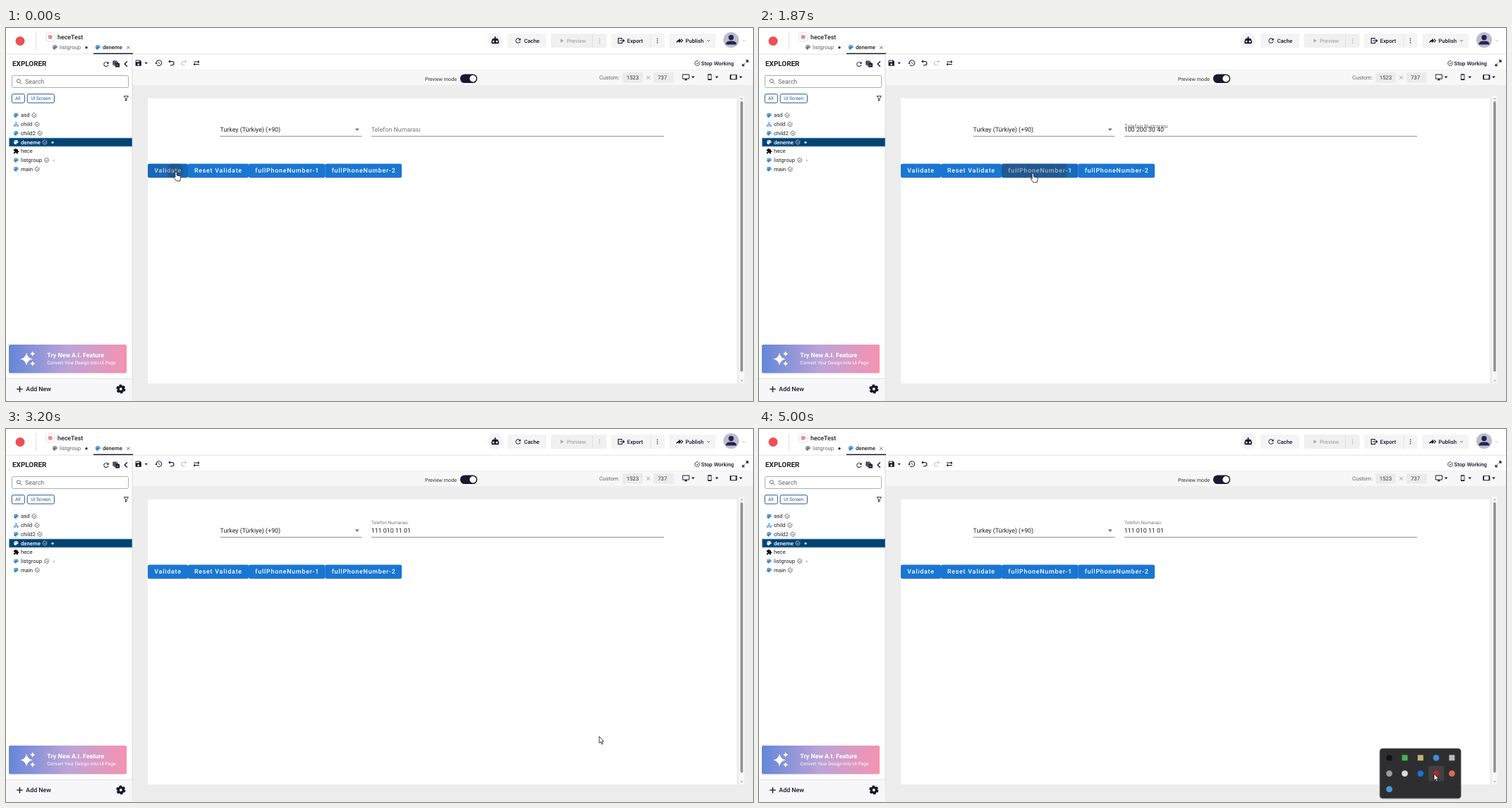
Animation, 1059 px wide and 529 px high, one loop 5200 ms. Source, as an HTML page:

```html
<!DOCTYPE html>
<html lang="en">
<head>
<meta charset="utf-8">
<title>Phone field demo</title>
<style>
html, body { margin: 0; width: 100%; height: 100%; overflow: hidden; background: #fff; }
svg { display: block; width: 1059px; height: 529px; font-family: Roboto, Arial, sans-serif; text-rendering: geometricPrecision; }
</style>
</head>
<body>
<svg id="stage" viewBox="0 0 1059 529"></svg>
<script>
const LOOP = 5200, STEP = 200 / 3;
const INK = '#15152b', GREY = '#666', BLUE = '#1976d2', SKY = '#2f86c9', RED = '#ee4f55';

// 24-unit icons; a leading ~ marks an outline icon
const ICONS = {
  refresh: 'M17.65 6.35A8 8 0 1 0 19.730 14h-2.080A6 6 0 1 1 16.220 7.780L13 11h7V4z',
  palette: 'M12 3a9 9 0 1 0 0 18c2 0 2-2 1.100-3s-.1-2 1.400-2H16c3 0 5-2 5-5c0-4.400-4-8-9-8z' +
    [[5, 10.5], [8, 6.5], [13, 6.5], [16, 10.5]].map(([x, y]) => `M${x} ${y}a1.500 1.500 0 1 0 3 0a1.500 1.500 0 1 0-3 0z`).join(''),
  undo: '~M8 4L4 8l4 4M4 8h10a6 6 0 0 1 0 12H8',
  redo: '~M16 4l4 4-4 4M20 8H10a6 6 0 0 0 0 12h6',
  history: 'M13 3a9 9 0 0 0-9 9H1l3.900 3.900L9 12H6a7 7 0 1 1 2.060 4.940l-1.420 1.420A9 9 0 1 0 13 3zM12 8v5l4.300 2.500.7-1.200-3.500-2V8z',
  save: 'M17 3H5a2 2 0 0 0-2 2v14a2 2 0 0 0 2 2h14a2 2 0 0 0 2-2V7zM12 19a3 3 0 1 1 0-6 3 3 0 0 1 0 6zM15 9H5V5h10z',
  swap: 'M17 3l5 5-5 5V9.200H3V6.800h14zM7 11v3.800h14v2.400H7V21l-5-5z',
  check: '~M21 11v1a9 9 0 1 1-5-8M8 11l4 4L22 5',
  search: '~M16 10a6 6 0 1 1-12 0a6 6 0 1 1 12 0M14.500 14.500L21 21',
  filter: '~M4 4h16l-6 8v7l-4 2v-9z',
  robot: 'M12 2a2 2 0 0 1 1 3.700V7h1a7 7 0 0 1 7 7h1v4h-1v3H3v-3H2v-4h1a7 7 0 0 1 7-7h1V5.700A2 2 0 0 1 12 2zM7.500 13a2.500 2.500 0 1 0 0 5a2.500 2.500 0 0 0 0-5zM16.500 13a2.500 2.500 0 1 0 0 5a2.500 2.500 0 0 0 0-5z',
  play: 'M7 4v16l13-8z',
  dots: [5, 12, 19].map(y => `M10 ${y}a2 2 0 1 0 4 0a2 2 0 1 0-4 0z`).join(''),
  out: '~M14 8V4H3v16h12v-4M8 12h14M18 8l4 4-4 4',
  share: 'M9 5l7 7-7 7v-4c-4 0-6 1-9 4c1-6 4-9 9-10zM15 5l7 7-7 7v-3l4-4-4-4z',
  puzzle: 'M20.500 11H19V7a2 2 0 0 0-2-2h-4V3.500a2.500 2.500 0 0 0-5 0V5H4a2 2 0 0 0-2 2v3.800h1.500a2.700 2.700 0 0 1 0 5.400H2V20a2 2 0 0 0 2 2h3.800v-1.500a2.700 2.700 0 0 1 5.400 0V22H17a2 2 0 0 0 2-2v-4h1.500a2.500 2.500 0 0 0 0-5z',
  group: '~M9 6a3 3 0 1 0 6 0a3 3 0 1 0-6 0M12 9v5M6 15l6-2 6 2M3 15h6v6H3zM15 15h6v6h-6z',
  monitor: 'M21 3H3a2 2 0 0 0-2 2v11a2 2 0 0 0 2 2h7v2H8v2h8v-2h-2v-2h7a2 2 0 0 0 2-2V5a2 2 0 0 0-2-2zM21 16H3V5h18z',
  phone: 'M17 1H7a2 2 0 0 0-2 2v18a2 2 0 0 0 2 2h10a2 2 0 0 0 2-2V3a2 2 0 0 0-2-2zM17 19H7V5h10z',
  tablet: 'M21 4H3a2 2 0 0 0-2 2v12a2 2 0 0 0 2 2h18a2 2 0 0 0 2-2V6a2 2 0 0 0-2-2zM19 18H5V6h14z',
  collapse: 'M2 2h13v3H5v10H2zM6 6h13v3H9v9H6zM10 10h13v12H10zM13 15v2h7v-2z',
  expand: '~M14 3h7v7M21 3l-7 7M3 14v7h7M3 21l7-7',
  left: '~M16 4l-8 8 8 8',
  down: '~M5 9l7 7 7-7',
  close: '~M5 5l14 14M19 5L5 19',
  plus: '~M12 3v18M3 12h18',
  caret: 'M4 8h16l-8 9z',
  up: 'M4 16h16l-8-9z'
};

const rect = (x, y, w, h, fill, rx = 0, more = '') =>
  `<rect x="${x}" y="${y}" width="${w}" height="${h}" rx="${rx}" fill="${fill}" ${more}/>`;
const box = (x, y, w, h, stroke, rx, width = 1, fill = 'none') =>
  rect(x, y, w, h, fill, rx, `stroke="${stroke}" stroke-width="${width}"`);
const disc = (x, y, r, fill, more = '') => `<circle cx="${x}" cy="${y}" r="${r}" fill="${fill}" ${more}/>`;
const text = (x, cy, str, size, fill = '#222', weight = 400, more = '') =>
  `<text x="${x}" y="${cy + size * .355}" font-size="${size}" fill="${fill}" font-weight="${weight}" ${more}>${str}</text>`;
const icon = (name, cx, cy, size, color = INK, width = 2.4) => {
  const d = ICONS[name], line = d[0] === '~';
  const paint = line ? `fill="none" stroke="${color}" stroke-width="${width}"` : `fill="${color}" fill-rule="evenodd"`;
  return `<path d="${line ? d.slice(1) : d}" ${paint} transform="translate(${cx - size / 2} ${cy - size / 2}) scale(${size / 24})"/>`;
};
const star = (x, y, r) =>
  `<path d="M0-8Q1.200-1.200 8 0Q1.200 1.200 0 8Q-1.200 1.200-8 0Q-1.200-1.200 0-8z" fill="#fff" transform="translate(${x} ${y}) scale(${r / 8})"/>`;

const S = 6.62, M = 7.72, L = 8.83;

function header() {
  return rect(0, 0, 1059, 37, '#fff') + rect(0, 36.7, 1059, .8, '#dcdcdf') +
    disc(20, 18.5, 6.5, RED) + rect(42, 6, .7, 25, '#d5d5d8') +
    box(56.5, 6.5, 12.5, 12.5, '#dcdcdf', 3, .8) + disc(62.7, 12.7, 3, '#f3868a') +
    text(73, 12.7, 'heceTest', L, '#222', 500) +
    icon('palette', 69.5, 27.3, 9, '#777') + text(76, 27, 'listgroup', M, GREY) + disc(114, 27.8, 1.7, '#333') +
    icon('palette', 130.3, 27.3, 9, SKY) + text(137, 27, 'deneme', M, '#222', 500) +
    icon('close', 173.3, 27.7, 7, '#333') + rect(124, 35.6, 56, 1.4, INK) +
    disc(693.5, 17.7, 11, '#f3f3f4') + icon('robot', 693.5, 17.3, 13) +
    rect(711, 8, 55, 20, '#f4f4f5', 2) + icon('refresh', 726, 18, 11) + text(734.4, 18, 'Cache', M, INK, 500) +
    rect(772.5, 8, 79, 20, '#f0f0f1', 2) + rect(831, 8, .8, 20, '#dedee0') +
    icon('play', 788, 18, 8.5, '#aaa') + text(795, 18, 'Preview', M, '#aaa', 500) + icon('dots', 841.5, 18, 9.5, '#aaa') +
    rect(858, 8, 75.5, 20, '#f4f4f5', 2) + rect(913.5, 8, .8, 20, '#dedee0') +
    icon('out', 872, 18, 10.5, INK, 2.8) + text(880.6, 18, 'Export', M, INK, 500) + icon('dots', 923.5, 18, 9.5) +
    rect(940, 8, 66, 20, '#f4f4f5', 2) + icon('share', 955.5, 18, 11) + text(963.3, 18, 'Publish', M, INK, 500) +
    icon('down', 996, 18, 6.5) +
    disc(1028, 17, 11, '#bdbdd2') + disc(1028, 13.5, 3.7, '#24244a') +
    '<path d="M1020.500 23.500v-1a5.500 4 0 0 1 5.500-4h4a5.500 4 0 0 1 5.500 4v1z" fill="#24244a"/>' +
    icon('down', 1046, 18, 6, '#999');
}

function sidebar() {
  const rows = [
    ['asd', 'palette', 40], ['child', 'group', 44], ['child2', 'palette', 48], ['deneme', 'palette', 55],
    ['hece', 'puzzle'], ['listgroup', 'palette', 57.7], ['main', 'palette', 44.3]
  ];
  let s = rect(0, 37.5, 179, 491.5, '#fff') + rect(178.6, 37.5, .9, 491.5, '#d3d3d6') +
    text(9, 50.3, 'EXPLORER', 9.93, '#222', 700) +
    icon('refresh', 142, 51.3, 11) + icon('collapse', 156, 51, 11) + icon('left', 170, 51, 11, INK, 3) +
    box(8.5, 67.5, 165, 17, '#999', 2, .8) + icon('search', 18.7, 76, 10, '#555', 2) + text(27, 76, 'Search', L, GREY) +
    box(8.3, 93.7, 18, 12.4, '#24598f', 1.8, 1) + text(13, 99.8, 'All', S, '#24598f') +
    box(30.2, 93.7, 38.2, 12.4, '#24598f', 1.8, 1) + text(35.2, 99.8, 'UI Screen', S, '#24598f') +
    icon('filter', 170.3, 99.8, 9.5, INK, 2.2) +
    box(4.8, 156.2, 173.8, 11.6, '#1878bd', 0, .8, '#05426f');
  rows.forEach(([name, kind, mark], i) => {
    const y = 123.7 + i * 12.73, on = i === 3;
    s += icon(kind, 14.4, y, kind === 'group' ? 8 : 8.6, on ? '#fff' : kind === 'puzzle' ? '#111' : SKY) +
      text(21, y, name, M, on ? '#fff' : '#222', on ? 500 : 400);
    if (mark) s += icon('check', mark, y, 8, on ? '#fff' : '#222', 2);
  });
  return s + disc(66, 162.2, 1.5, '#fff') + disc(67.8, 188, 1.4, '#ccc') +
    rect(4, 449, 167, 40.5, 'url(#promo)', 2) + star(29, 469.5, 9) + star(37.7, 462, 4) + star(37.7, 476, 4) +
    text(58.3, 464.3, 'Try New A.I. Feature', L, '#fff', 700) +
    text(58.3, 474.7, 'Convert Your Design Into UI Page', S, '#fff') +
    rect(0, 497, 178.6, 32, '#f7f7f9') + rect(0, 496.7, 178.6, .8, '#dcdcdf') +
    icon('plus', 19.5, 512.2, 11.5, INK, 2.8) + text(28.3, 512.3, 'Add New', L, INK, 500) +
    disc(162.8, 512, 3.6, 'none', `stroke="${INK}" stroke-width="3.400"`) +
    disc(162.8, 512, 5.6, 'none', `stroke="${INK}" stroke-width="2" stroke-dasharray="3.300 2.564"`);
}

function toolbar() {
  return rect(179.5, 37.5, 880, 22, '#fff') + rect(179.5, 59.5, 880, 22, '#f7f7f8') +
    rect(179.5, 59.3, 880, .6, '#e6e6e8') + rect(179.5, 81.3, 880, .6, '#e2e2e4') +
    icon('save', 187.7, 49.7, 11) + icon('caret', 198.7, 49.8, 6.5) + icon('history', 216.4, 49.6, 11.5) +
    icon('undo', 234.5, 49.2, 10.5) + icon('redo', 252, 49.2, 10.5, '#c4c4c8') + icon('swap', 270, 49.7, 10.5) +
    icon('check', 980, 50, 9, INK, 2.2) + text(985.6, 50, 'Stop Working', M, INK, 500) + icon('expand', 1048, 49.8, 10.5) +
    text(594, 72, 'Preview mode', 7.17, '#333') +
    rect(643.8, 65.5, 24.4, 12.6, '#18182f', 6.3) + disc(662, 71.8, 4.7, '#fff') +
    text(841, 70.2, 'Custom:', M, GREY) + rect(874, 63, 28.5, 14.5, '#ebebec', 1) + text(879.7, 70.2, '1523', M, '#333') +
    icon('close', 910.5, 70.3, 8.5, '#777', 2) + rect(918, 63, 28.5, 14.5, '#ebebec', 1) + text(924, 70.2, '737', M, '#333') +
    icon('monitor', 963.8, 69.7, 11) + icon('caret', 974, 69.7, 7) +
    icon('phone', 997.6, 69.6, 9.5) + icon('caret', 1007.7, 69.7, 7) +
    icon('tablet', 1031.3, 69.6, 11) + icon('caret', 1041.6, 69.7, 7);
}

// label, x, width, text x, click time, ripple x, hover start, hover end
const BUTTONS = [
  ['Validate', 201, 57, 210.3, -60, 240, -400, 270],
  ['Reset Validate', 258, 86, 266.9, 1070, 318, 930, 1270],
  ['fullPhoneNumber-1', 344, 108.4, 353.3, 1730, 387, 1620, 2130],
  ['fullPhoneNumber-2', 452.4, 108.6, 461.7, 2330, 487, 2200, 2730]
];

function page() {
  let s = rect(179.5, 81.8, 880, 447.2, '#ededee') + rect(201, 99.7, 835, 404.3, '#fff') +
    rect(1039.5, 96, 7, 408, '#f8f8f8') + icon('up', 1043, 100, 5, '#8a8a8a') + icon('caret', 1043, 500.3, 5, '#8a8a8a') +
    rect(1041.2, 104, 3.5, 383.5, '#8e8e8e', 1.7) +
    text(303.6, 144, 'Turkey (Türkiye) (+90)', L, '#222') + icon('caret', 497.8, 144, 9, '#757575') +
    rect(303.5, 153, 201, .7, '#666') + rect(518, 153, 415, .7, '#666', 0, 'id="line"') +
    '<text id="label" x="518" fill="#777">Telefon Numarası</text>' +
    text(517.7, 144, '', L, '#222', 400, 'id="value"') +
    text(518, 161, 'Zorunlu alanı doldurunuz .', S, '#e05656', 400, 'id="error"');
  BUTTONS.forEach(([label, x, w, tx, , rx], i) => {
    const shape = fill => rect(x, 192.4, w, 19.8, fill, 2.2);
    s += `<clipPath id="clip${i}">${shape('#000')}</clipPath>` + rect(x, 193, w, 19.8, '#0003', 2.2) + shape(BLUE) +
      text(tx, 202.2, label, L, '#fff', 500, 'letter-spacing=".79"') +
      `<g clip-path="url(#clip${i})">` + rect(x, 192, w, 21, '#000', 0, `id="hover${i}"`) +
      disc(rx, 202.5, 0, '#333', `id="ripple${i}"`) + '</g>';
  });
  return s;
}

function tray() {
  const cols = [893.5, 915.5, 937.8, 960, 982.3];
  const apps = [
    ['#141414', 1], ['#4caf50', 0], ['#c5ae78', 0], ['#3a8ddb', 1], ['#b4bac2', 0],
    ['#9a9a9a', 1], ['#d9dcd9', 1], ['#1c70d8', 1], ['#b3262d', 1], ['#e06a4c', 1], ['#4a98de', 1]
  ];
  return '<g id="tray">' + rect(879, 452.5, 117, 73, '#0002', 5) + box(880.3, 453.3, 114.6, 70.4, '#454547', 4, .6, '#2e2e30') +
    rect(949, 477.5, 22, 22, '#414143', 2, 'id="spot"') +
    apps.map(([c, round], i) => {
      const x = cols[i % 5], y = 466.3 + Math.floor(i / 5) * 22.3;
      return round ? disc(x, y, 4.4, c) : rect(x - 4, y - 4, 8, 8, c);
    }).join('') + '</g>';
}

const cursor = '<g id="cursor" fill="#fff" stroke="#111" stroke-width=".8" stroke-linejoin="round">' +
  '<path id="arrow" d="M0 0v9.500l2.100-1.900 1.500 3.500 1.600-.7-1.500-3.400h2.700z"/>' +
  '<path id="hand" d="M-1.200 1.200a1.200 1.200 0 0 1 2.400 0v3.800l4.400 1c1 .3 1.400 1 1.200 2l-.8 3.200v1.800H.7L-3 8.500c-.7-1 .5-1.900 1.300-1.200l.5.600z"/></g>';

const stage = document.getElementById('stage');
stage.innerHTML = '<defs><linearGradient id="promo"><stop stop-color="#6487d8"/><stop offset=".5" stop-color="#bda3d8"/>' +
  '<stop offset="1" stop-color="#f692b1"/></linearGradient></defs>' +
  page() + toolbar() + sidebar() + header() + tray() + cursor;

const $ = id => document.getElementById(id);
const set = (id, attrs) => { for (const k in attrs) $(id).setAttribute(k, attrs[k]); };
const show = (id, on) => set(id, { visibility: on ? 'visible' : 'hidden' });
const ramp = (t, from, to) => Math.min(1, Math.max(0, (t - from) / (to - from)));

// time, x, y of the pointer tip
const PATH = [
  [0, 241, 204], [130, 241, 205], [200, 245, 210], [330, 259, 229], [400, 270, 234], [530, 291, 227], [600, 296, 222],
  [730, 305, 229], [870, 316, 219], [1000, 318, 206], [1200, 318, 207], [1330, 319.6, 219.6], [1400, 326, 229],
  [1470, 340, 228], [1600, 362, 219], [1670, 375, 211], [1800, 387, 206], [2000, 391, 206], [2130, 425, 208],
  [2200, 455, 211], [2267, 482, 209.5], [2333, 487, 207], [2667, 489, 207], [2733, 505, 213], [2800, 540, 236],
  [2933, 650, 322], [3067, 790, 413], [3200, 841, 436], [3267, 850, 443], [3333, 880, 470], [3400, 914, 500],
  [3467, 935, 519], [3533, 946, 540], [4533, 947, 540], [4600, 949, 531], [4667, 953, 517], [4733, 956.5, 499],
  [4800, 956.7, 497.5], [5000, 957, 489]
];
const RISE = [[4266, 57], [4334, 57], [4400, 20], [4466, 6], [4533, 1], [4600, 0]];

function at(table, t) {
  const i = table.findIndex(row => row[0] > t);
  if (i < 0) return table[table.length - 1].slice(1);
  if (i === 0) return table[0].slice(1);
  const a = table[i - 1], b = table[i], p = ramp(t, a[0], b[0]);
  return a.slice(1).map((v, k) => v + (b[k + 1] - v) * p);
}

function draw(time) {
  const t = Math.floor((time + 4) / STEP) * STEP;

  const bad = ramp(t, 60, 260) * (t < 1130 ? 1 : 0);
  set('error', { opacity: bad });
  set('line', { fill: bad > .4 ? '#a85252' : '#666' });

  const up = ramp(t, 1800, 1950), size = L + (S - L) * up;
  set('label', { 'font-size': size, y: 144 - 11.5 * up + size * .355 });
  $('value').textContent = t < 1860 ? '' : t < 2390 ? '100 200 30 40' : '111 010 11 01';

  BUTTONS.forEach(([, , w, , click, , enter, leave], i) => {
    set('hover' + i, { opacity: .12 * ramp(t, enter, enter + 300) * (1 - ramp(t, leave, leave + 130)) });
    set('ripple' + i, {
      r: w * .9 * ramp(t, click, click + 270),
      opacity: .3 * (1 - ramp(t, click + 270, click + 530))
    });
  });

  show('tray', t >= 4266);
  show('spot', t >= 4700);
  set('tray', { transform: `translate(0 ${at(RISE, t)[0]})` });

  const [x, y] = at(PATH, t), over = y > 192 && y < 212.3 && x < 561;
  set('cursor', { transform: `translate(${x} ${y})` });
  show('arrow', !over);
  show('hand', over);
}

const start = performance.now();
function tick() {
  draw((performance.now() - start) % LOOP);
  requestAnimationFrame(tick);
}
tick();
</script>
</body>
</html>
```
